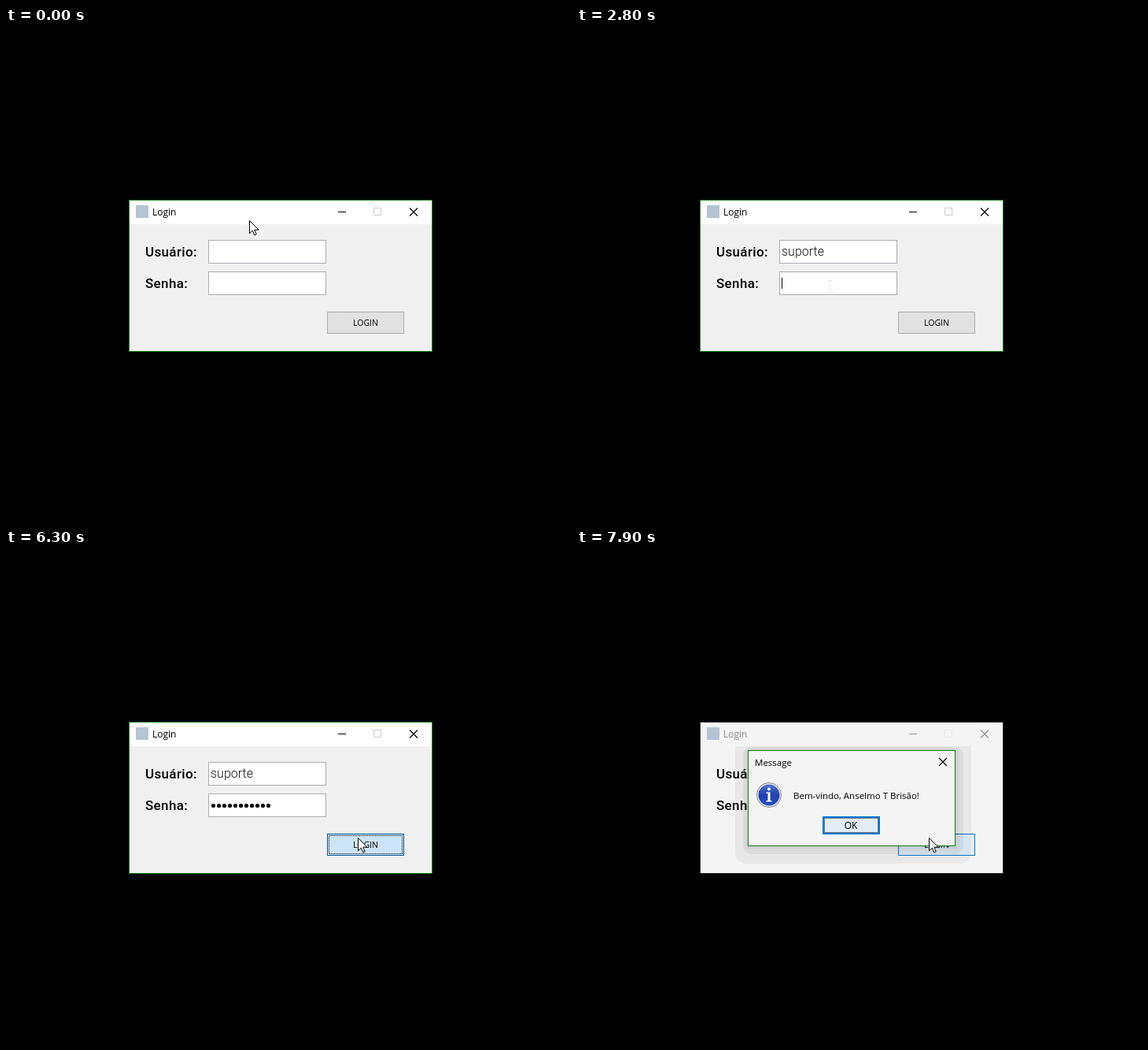
Animation, 718 px wide and 627 px high, one loop 8 s. Source, as an HTML page:

```html
<!DOCTYPE html>
<html lang="pt-BR">
<head>
<meta charset="utf-8">
<title>Login</title>
<style>
  html, body { margin: 0; width: 100%; height: 100%; overflow: hidden; background: #000; }
  svg { display: block; }
  text { font: 12px "Open Sans", "Noto Sans", sans-serif; white-space: pre; }
  .crisp { shape-rendering: crispEdges; }
  .label { font: 500 17px Roboto, sans-serif; letter-spacing: .35px; }
  .input { font: 300 16px Roboto, sans-serif; fill: #111; }
  .small { font-size: 11.5px; }
  .field { fill: #fff; stroke: #abadb3; }
  .caption { fill: none; stroke: #000; }
  .max { stroke: #ccc; }
  .focus { fill: none; stroke: #000; stroke-dasharray: 1 1; }
  #title { fill: #000; }
  #frame { fill: #f0f0f0; stroke: #107c10; }
  #bar { fill: #fff; }
  .inactive #title { fill: #8c8c8c; }
  .inactive #frame { fill: #f4f4f4; stroke: #2c2c2c; }
  .inactive #bar { fill: #f4f4f4; }
  .inactive .caption { stroke: #8c8c8c; }
  .inactive .max { stroke: #e6e6e6; }
</style>
</head>
<body>
<svg width="718" height="627" viewBox="0 0 718 627">
  <defs>
    <linearGradient id="blue" x2="0" y2="1">
      <stop offset="0" stop-color="#5273cf"/>
      <stop offset=".5" stop-color="#1f41ae"/>
      <stop offset="1" stop-color="#2450c8"/>
    </linearGradient>
    <clipPath id="client"><rect x="157" y="249" width="384" height="161"/></clipPath>
  </defs>

  <g id="window">
    <rect id="frame" class="crisp" x="156.5" y="218.5" width="385" height="192"/>
    <rect id="bar" x="157" y="219" width="384" height="30"/>
    <rect x="165" y="225" width="16" height="16" fill="#b4c4d3"/>
    <text id="title" x="186" y="238">Login</text>
    <path class="caption" d="M422 233.5h10"/>
    <path class="caption max" d="M467.5 228.5h9v9h-9z"/>
    <path class="caption" d="M513 228.5l10 10m0-10l-10 10" stroke-width="1.15"/>

    <text class="label" x="177" y="290">Usuário:</text>
    <text class="label" x="177" y="330">Senha:</text>
    <rect class="field crisp" x="257.5" y="269.5" width="149" height="29"/>
    <rect class="field crisp" x="257.5" y="309.5" width="149" height="29"/>
    <text class="input" id="user" x="260" y="289"></text>
    <g id="dots"></g>
    <rect id="caret" class="crisp" width="1"/>

    <rect id="button" class="crisp" x="408.5" y="360.5" width="97" height="27"/>
    <rect id="buttonFocus" class="focus crisp" x="410.5" y="362.5" width="93" height="23"/>
    <text x="457" y="378" text-anchor="middle" style="font-size:10.5px">LOGIN</text>
  </g>

  <g clip-path="url(#client)"><g id="shadow"></g></g>

  <g id="dialog">
    <rect x="217.5" y="254.5" width="263" height="121" fill="#f4f4f4" stroke="#107c10"/>
    <text class="small" x="226" y="274">Message</text>
    <path d="M460 264l10 10m0-10l-10 10" stroke="#000" stroke-width="1.15"/>
    <circle cx="244" cy="311" r="15.5" fill="#ececee" stroke="#858585"/>
    <circle cx="244" cy="311" r="13.5" fill="url(#blue)"/>
    <circle cx="244" cy="303.5" r="2" fill="#fff"/>
    <path d="M240.5 307.5h5v10.5h2v1.5h-7v-1.5h2v-9h-2z" fill="#fff"/>
    <text class="small" x="275" y="316">Bem-vindo, Anselmo T Brisão!</text>
    <rect x="313" y="339" width="71" height="21" fill="#e1ecf6" stroke="#0078d7" stroke-width="2"/>
    <rect class="focus" x="314.5" y="340.5" width="68" height="18"/>
    <text x="348" y="354" text-anchor="middle">OK</text>
  </g>

  <path id="beam" class="crisp" d="M-3.5-7.5h3m1 0h3M0-7V7M-3.5 7.5h3m1 0h3" fill="none" stroke="#e9e9e9"/>
  <path id="arrow" d="M.5.5V16.8L4.3 13.2 6.8 18.9 9.2 17.9 6.8 12.2H12z" fill="#fff" stroke="#000"/>
</svg>

<script>
const LOOP = 8000;
const USER = "suporte";
const START_X = 260, DOT_STEP = 7, DOT_COUNT = 11;
const $ = id => document.getElementById(id);
const set = (el, attrs) => Object.entries(attrs).forEach(([k, v]) => el.setAttribute(k, v));

function add(parent, tag, attrs) {
  const el = document.createElementNS("http://www.w3.org/2000/svg", tag);
  set(el, attrs);
  return parent.appendChild(el);
}

const userKeys = [600, 900, 1100, 1300, 1400, 1500, 1700];
const dotKeys = [3600, 3800, 4000, 4100, 4200, 4300, 4500, 4800, 4900, 5000, 5100];

// Each track lists [start time, ...values]; values hold until the next row.
const caretTrack = [
  [0, ""], [400, "user"], [2200, ""], [2700, "user"], [2800, "pass"], [3500, ""],
  [3600, "pass"], [5600, ""], [6100, "pass"], [6300, ""]
];
const pointerTrack = [
  [0, "arrow", 309, 244], [2000, "arrow", 309, 250], [2100, "beam", 312.5, 285],
  [2200, "beam", 312.5, 302], [2400, "beam", 321.5, 328], [5600, "arrow", 416, 339],
  [5700, "arrow", 424, 348], [5800, "arrow", 434, 357], [5900, "arrow", 441, 362],
  [6000, "arrow", 446, 364], [6100, "arrow", 447, 365]
];
const buttonTrack = [
  [0, "#e1e1e1", "#adadad", false], [5900, "#e3e9ee", "#568fbe", false],
  [6000, "#e5f1fb", "#0078d7", false], [6300, "#cce4f7", "#005499", true],
  [7600, "#cce4f7", "#005499", false], [7700, "#d6e9f9", "#0060ac", false],
  [7800, "#dcedfa", "#006cc2", false], [7900, "#e5f1fb", "#0078d7", false]
];
// opacity, scale, shadow opacity
const dialogTrack = [
  [0, 0, 1, 0], [7600, .2, .955, .35], [7700, .65, .985, .75], [7800, .92, .996, .95], [7900, 1, 1, 1]
];

const at = (track, t) => track.findLast(row => row[0] <= t).slice(1);
const typed = (keys, t) => keys.filter(k => k <= t).length;
const show = (el, on) => set(el, { visibility: on ? "visible" : "hidden" });

const dots = Array.from({ length: DOT_COUNT }, (_, i) =>
  add($("dots"), "circle", { cx: START_X + 3.5 + i * DOT_STEP, cy: 324.5, r: 2.6 }));

// Shadow rings leave a hole where the dialog sits.
function ring(x, y, w, h, r, alpha) {
  const a = (dx, dy) => `a${r} ${r} 0 0 1 ${dx} ${dy}`;
  const d = `M${x + r} ${y}h${w - 2 * r}${a(r, r)}v${h - 2 * r}${a(-r, r)}h${2 * r - w}${a(-r, -r)}v${2 * r - h}${a(r, -r)}z`;
  add($("shadow"), "path", { d: d + "M217 254h264v122h-264z", "fill-rule": "evenodd", "fill-opacity": alpha });
}
ring(201, 238, 300, 160, 14, .05);
ring(211, 250, 280, 136, 10, .05);
ring(213, 252, 273, 130, 7, .02);
ring(215, 253, 269, 126, 4, .04);

function render(t) {
  const user = $("user");
  user.textContent = USER.slice(0, typed(userKeys, t));
  const dotCount = typed(dotKeys, t);
  dots.forEach((dot, i) => show(dot, i < dotCount));

  const [owner] = at(caretTrack, t);
  show($("caret"), owner);
  if (owner === "user") {
    const x = START_X + (user.textContent ? Math.floor(user.getComputedTextLength()) : 0);
    set($("caret"), { x, y: 274, height: 19 });
  } else {
    set($("caret"), { x: START_X + dotCount * DOT_STEP, y: 317, height: 14 });
  }

  const [fill, stroke, focused] = at(buttonTrack, t);
  set($("button"), { fill, stroke });
  show($("buttonFocus"), focused);

  const [opacity, scale, shade] = at(dialogTrack, t);
  const transform = `translate(349 285) scale(${scale}) translate(-349 -285)`;
  set($("dialog"), { opacity, transform });
  set($("shadow"), { opacity: shade, transform });
  $("window").classList.toggle("inactive", t >= 7600);

  const [kind, x, y] = at(pointerTrack, t);
  for (const id of ["arrow", "beam"]) {
    show($(id), id === kind);
    set($(id), { transform: `translate(${x} ${y})` });
  }
}

const start = performance.now();
function tick() {
  render((performance.now() - start) % LOOP);
  requestAnimationFrame(tick);
}
tick();
</script>
</body>
</html>
```
